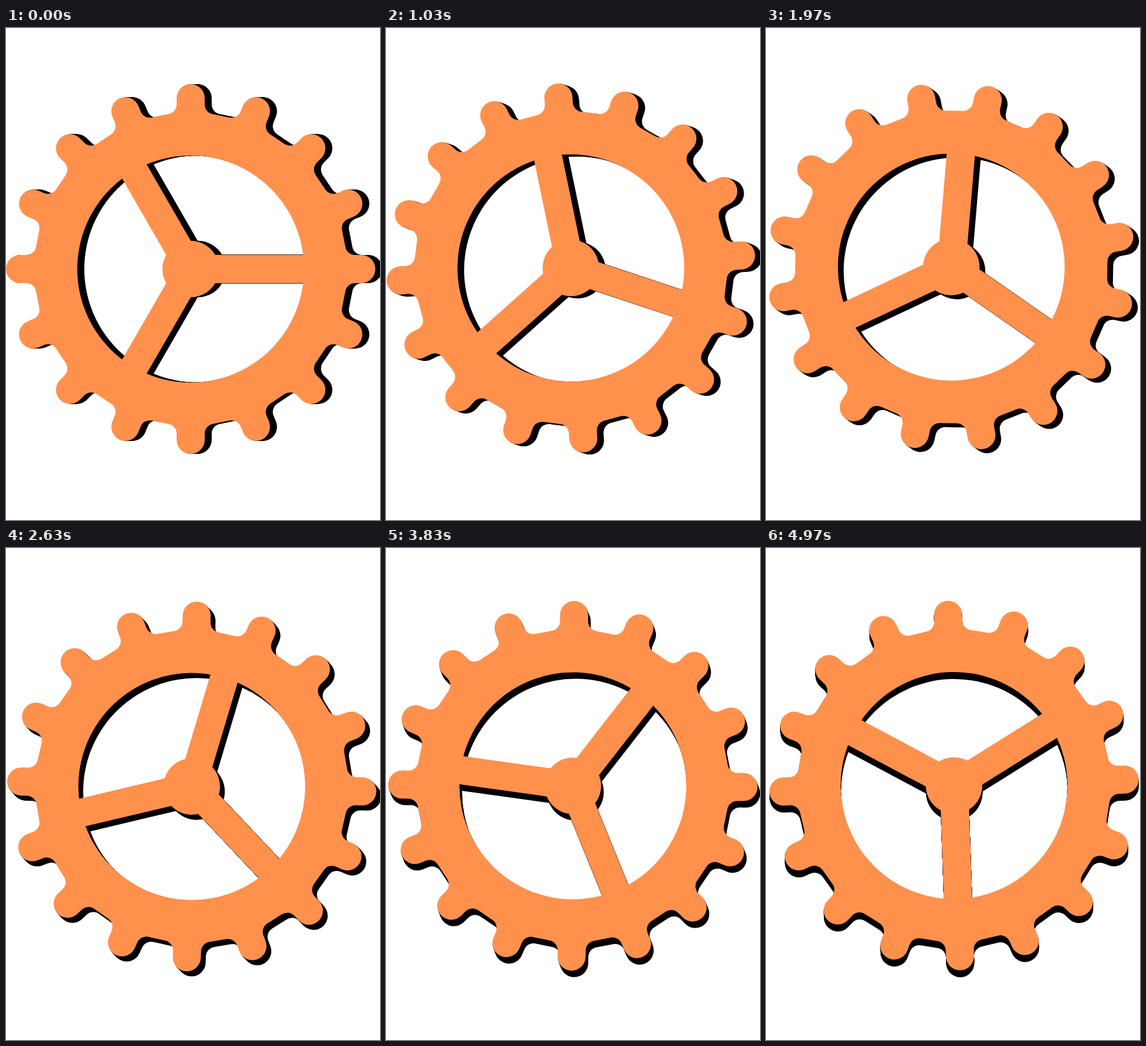
These frames come from a looping animation (640 by 841 pixels, 5.01 s). An HTML page:

```html
<!DOCTYPE html>
<html lang="en">
<head>
<meta charset="utf-8">
<title>Turning gear</title>
<style>
  html, body { margin: 0; width: 100%; height: 100%; overflow: hidden; background: #fff; }
  svg { display: block; width: 100%; height: 100%; }
</style>
</head>
<body>
<svg viewBox="0 0 640 841">
  <defs>
    <g id="gear">
      <path id="rim" fill="currentColor" fill-rule="evenodd"/>
      <path id="spokes" stroke="currentColor" stroke-width="48.4" fill="none"/>
      <circle r="48.3" fill="currentColor"/>
    </g>
  </defs>
  <g id="wheel"></g>
</svg>
<script>
const LOOP = 5010, STEPS = 150, TURN = 88;
const TEETH = 16, HOLE = 194, DEPTH = 12;
const CENTER = { x: 322, y: 412 };
const byId = id => document.getElementById(id);

// Rotates a point given with the gear's centre at 0,0
function turned(x, y, degrees) {
  const a = degrees * Math.PI / 180, c = Math.cos(a), s = Math.sin(a);
  return `${(x * c - y * s).toFixed(2)} ${(x * s + y * c).toFixed(2)}`;
}

function toothPath(i) {
  const at = (x, y) => turned(x, y, i * 360 / TEETH);
  return `${i ? 'L' : 'M'}${at(-38, -264.7)}
    A17 17 0 0 0 ${at(-24, -281.4)} L${at(-24, -292)}
    A24 24 0 0 1 ${at(24, -292)} L${at(24, -281.4)}
    A17 17 0 0 0 ${at(38, -264.7)}`;
}

function build() {
  const teeth = Array.from({ length: TEETH }, (_, i) => toothPath(i)).join('');
  const hole = `M${-HOLE} 0A${HOLE} ${HOLE} 0 1 0 ${HOLE} 0A${HOLE} ${HOLE} 0 1 0 ${-HOLE} 0Z`;
  byId('rim').setAttribute('d', `${teeth}Z${hole}`);
  byId('spokes').setAttribute('d', [0, 120, 240].map(a => `M0 0L${turned(HOLE + 10, 0, a)}`).join(''));

  // Black copies from back to front form the thickness
  const layer = (x, color) => `<use href="#gear" x="${x}" color="${color}"/>`;
  let layers = '';
  for (let d = DEPTH; d > 0; d--) layers += layer(d - DEPTH / 2, '#000');
  byId('wheel').innerHTML = layers + layer(-DEPTH / 2, '#ff914d');
}

function draw(now) {
  const ticks = Math.floor((now % LOOP) / 10);
  const step = Math.min(STEPS - 1, Math.floor((3 * ticks + 1) / 10));
  const angle = TURN * step / (STEPS - 1);
  byId('wheel').setAttribute('transform', `translate(${CENTER.x} ${CENTER.y}) rotate(${angle})`);
  requestAnimationFrame(draw);
}

build();
draw(0);
</script>
</body>
</html>
```
